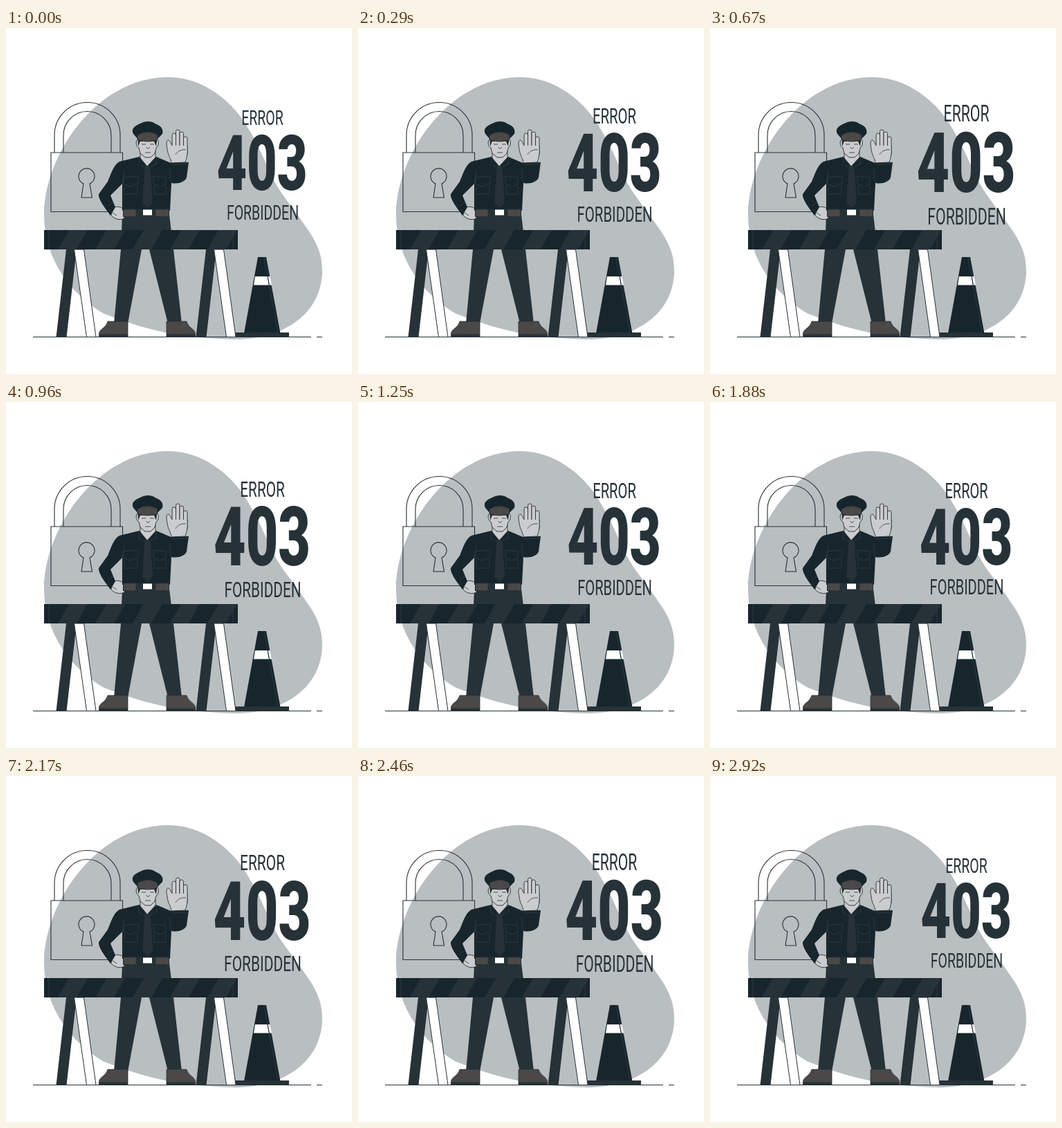
An HTML page for the animation above (2.96 s loop, 500 px wide and 500 px high).

```html
<!DOCTYPE html>
<html lang="en">
<head>
<meta charset="utf-8">
<title>Error 403</title>
<style>
html, body { margin: 0; width: 100%; height: 100%; overflow: hidden; background: #fff; }
svg { display: block; width: 100%; height: 100%; }
.line { fill: none; stroke: #263238; stroke-width: 1.1; }
.thin { fill: none; stroke: #263238; stroke-width: .8; }
.dark { fill: #17262c; }
.soft { fill: #263238; }
.white { fill: #fff; stroke: #263238; stroke-width: 1; }
.skin { fill: #cbcccd; stroke: #263238; stroke-width: .9; stroke-linejoin: round; }
.leather { fill: #4b4848; stroke: #263238; stroke-width: .8; }
.seam { fill: none; stroke: #34434a; stroke-width: .7; }
text { font-family: Roboto, "Liberation Sans", sans-serif; text-anchor: middle; fill: #263238; }
.word { font-size: 30px; font-weight: 400; }
.code { font-size: 111px; font-weight: 900; }
</style>
</head>
<body>
<svg viewBox="0 0 500 500">
  <path fill="#b9bec1" d="M235 71C283 71 325 104 347 140C372 181 378 205 391 227C402 246 418 264 433 287C447 306 457 325 457 350C457 410 405 450 330 450C240 448 190 432 140 412C95 385 55 335 55 270C55 185 130 71 235 71Z"/>
  <path class="line" d="M39 446.500H441M449 446.500H457"/>

  <!-- padlock -->
  <g class="line">
    <path d="M65 180H168.500V265.500H65ZM70 180V155a47.500 47.500 0 0 1 95 0V180M83 180V155a34.500 34.500 0 0 1 69 0V180"/>
    <path d="M112 225L109 245H124.500L121 225A11.500 11.500 0 1 0 112 225Z"/>
  </g>

  <!-- cone -->
  <path class="dark" d="M364 331H376L396.500 441H344Z"/>
  <path class="soft" d="M331 440H409V446.500H331Z"/>
  <path fill="#fff" d="M360 359H381.500L384 371.500H358Z"/>
  <path class="seam" d="M373 331L393 440"/>
  <path fill="none" stroke="#17262c" d="M378 359L380.500 372"/>

  <!-- officer -->
  <path class="soft" d="M168 270H236L242 320L254 427H234L207 320L203 300L196 320L176 427H156L166 320Z"/>
  <g id="shoe">
    <path class="leather" d="M134.500 446.500V441C136 434 144 434 147 424H176V446.500Z"/>
    <path class="soft" d="M134.500 442.500H176V446.500H134.500Z"/>
  </g>
  <use href="#shoe" transform="matrix(-1 0 0 1 408 0)"/>
  <path class="skin" d="M153 260C160 257 167 258 171 263V275C165 278 158 277 152 271Z"/>
  <path class="thin" d="M154 267L160 271"/>
  <path class="dark" d="M193 186L164 193C156 197 152 210 147 222L134 240C133 247 142 259 151 271L158 259L151 242L168 225V264H237L239 224C250 226 259 222 261 216L264 194L238 195L217 186L205 198Z"/>
  <path class="seam" d="M168 226L171 207M239 224L236 204M147 257L155 252M239 198L263 197M193 187L191 197L204 203L218 196L217 187M204 203V262"/>
  <path class="seam" d="M170 216L191 214V225L180 229L170 226ZM213 214L231 216V226L222 229L213 225ZM171 228V240H190V227M214 227V240H231V228"/>
  <path class="soft" d="M201 199H207L209 205L212 252L205 260L197 252L200 205Z"/>
  <path class="soft" d="M169 262H236V273H169Z"/>
  <path class="leather" d="M170 262H188V272.500H170ZM216 262H235.500V272.500H216Z"/>
  <path fill="#fff" d="M198 262.500H211V270.500H198Z"/>

  <path class="skin" d="M194 178V188L204 200L216 187V178Z"/>
  <path class="skin" d="M191 161C187 161 187 171 192 173L194 181L201 187H209L215 181L217 173C221 171 222 162 217 160Z"/>
  <path class="soft" d="M190 157H219L217 171L214 164H194L191 171Z"/>
  <path class="thin" d="M196 168H202M208 168H214M203 172C203 175 207 175 208 172M201 180H209"/>
  <path class="dark" d="M184 153C180 145 187 141 194 138C201 134 211 134 217 139C224 141 228 147 226 153L219 160C210 154 199 154 190 160Z"/>
  <path class="leather" d="M190 155C198 149 212 149 219 155V161C212 165 197 165 190 161Z"/>

  <g class="skin">
    <rect x="240" y="152" width="5.500" height="34" rx="2.700"/>
    <rect x="245.500" y="147" width="5.500" height="38" rx="2.700"/>
    <rect x="251" y="150" width="5.500" height="36" rx="2.700"/>
    <rect x="256.500" y="157" width="5.500" height="28" rx="2.700"/>
    <path d="M240 170C238 167 237 162 234 162C231 163 232 169 233 175C234 184 238 187 239 195L259 194C261 188 263 181 262 170"/>
  </g>
  <path class="thin" d="M245 183C248 178 254 175 260 176"/>

  <!-- barrier -->
  <g id="trestles"></g>
  <path class="dark" d="M55 292H335V320H55Z"/>
  <g id="stripes" class="soft"></g>
  <path class="seam" d="M62 292V320M328 292V320"/>

  <g id="sign">
    <text class="word" transform="translate(370.5 140.5) scale(.65 1)">ERROR</text>
    <text class="code" transform="translate(370 234) scale(.68 1)">403</text>
    <text class="word" transform="translate(371 276.500) scale(.65 1)">FORBIDDEN</text>
  </g>
</svg>
<script>
const $ = id => document.getElementById(id);

$("trestles").innerHTML = [0, 202].map(x => `<g transform="translate(${x})">
  <path class="soft" d="M87 320H102L87.500 446.500H72.500Z"/>
  <path class="white" d="M98.500 320H112.500L130 446.500H116.500Z"/></g>`).join("");

$("stripes").innerHTML = [75, 129, 183, 237, 291].map(x =>
  `<path d="M${x} 320l16-28h27l-16 28z"/>`).join("");

const LOOP = 2960;
const turns = [0, 600, 1670, 2350, LOOP]; // alternately smallest and largest

function swell(t) {
  const i = turns.findIndex(end => t < end) - 1;
  const p = (t - turns[i]) / (turns[i + 1] - turns[i]);
  const eased = (p + (1 - Math.cos(Math.PI * p)) / 2) / 2;
  return i % 2 ? 1 - eased : eased;
}

function draw() {
  const scale = 1 + 0.094 * swell(performance.now() % LOOP);
  $("sign").setAttribute("transform", `translate(370 198) scale(${scale}) translate(-370 -198)`);
  requestAnimationFrame(draw);
}
draw();
</script>
</body>
</html>
```
